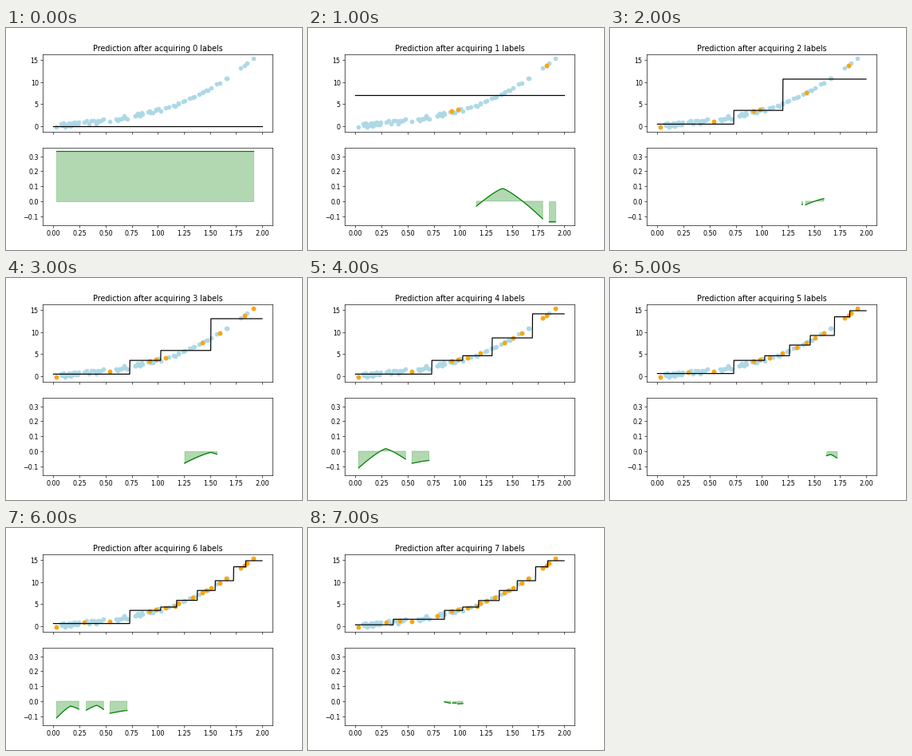
A matplotlib script that plays this animation: 371 px wide and 278 px high, repeating every 8000 ms.

```python
import numpy as np
import matplotlib.pyplot as plt
from matplotlib.animation import FuncAnimation

BATCH = 3
MIN_LEAF = 2
STEPS = 8
GAP = (np.nan, np.nan)

rng = np.random.default_rng(4)
grid = np.linspace(0, 2, 1000)


def trend(x):
    return 1.94 * x + 1.66 * x ** 3


def ripple(x):
    return np.where(x < 1.18, 0.33 * np.sin(11.2 * (x - 0.22)), 0)


def cluster(start, stop, count):
    """Noisy points along the trend; the noise fades to the right."""
    x = np.linspace(start, stop, count)
    spread = 0.1 + 0.45 * np.clip(5 - 4 * x, 0, 1)
    return np.column_stack([x, trend(x) + rng.uniform(-1, 1, count) * spread])


def predict(x, y):
    """Regression tree on sorted points, evaluated on the grid."""
    n = len(x)
    if n == 0:
        return np.zeros_like(grid)
    if n < 2 * MIN_LEAF:
        return np.full_like(grid, y.mean())

    def gain(k):
        return k * y[:k].mean() ** 2 + (n - k) * y[k:].mean() ** 2

    k = max(range(MIN_LEAF, n - MIN_LEAF + 1), key=gain)
    cut = (x[k - 1] + x[k]) / 2
    return np.where(grid <= cut, predict(x[:k], y[:k]), predict(x[k:], y[k:]))


def flank(foot, peak):
    """Slightly rounded slope from foot up to peak."""
    u = np.linspace(1, 0, 20)[:, None]
    return np.array(peak) + np.subtract(foot, peak) * u ** [1, 1.25]


def tent(start, peak, end=None):
    sides = [flank(start, peak)]
    if end:
        sides.append(flank(end, peak)[::-1])
    return np.vstack([*sides, GAP])


# Labelled positions in order of acquisition, one batch per row.
label_x = np.array([
    0.922, 0.983, 1.832,
    0.03, 0.542, 1.423,
    1.075, 1.595, 1.918,
    1.197, 1.507, 1.797,
    0.297, 1.335, 1.855,
    1.163, 1.467, 1.656,
    0.428, 0.785, 1.255,
])
label_y = trend(label_x) + ripple(label_x)

pool = np.vstack([
    cluster(0.07, 0.243, 14), cluster(0.32, 0.48, 8), cluster(0.6, 0.705, 8),
    cluster(0.785, 0.855, 7), cluster(0.905, 1.03, 6),
    cluster(1.105, 1.245, 4), cluster(1.305, 1.48, 5), cluster(1.565, 1.66, 2),
])

# Acquisition score after each batch, one tent per stretch of the pool.
shoulder = tent((0.542, -0.081), (0.705, -0.062))
scores = [
    [tent((0.03, 1 / 3), (1.918, 1 / 3))],
    [tent((1.16, -0.033), (1.41, 0.085), (1.795, -0.118)),
     tent((1.857, -0.137), (1.915, -0.137))],
    [tent((1.385, -0.022), (1.391, -0.02)),
     tent((1.42, -0.024), (1.595, 0.017))],
    [tent((1.255, -0.08), (1.507, -0.008), (1.565, -0.02))],
    [tent((0.03, -0.112), (0.29, 0.017), (0.48, -0.053)), shoulder],
    [tent((1.62, -0.03), (1.66, -0.022), (1.72, -0.045))],
    [tent((0.03, -0.112), (0.165, -0.033), (0.243, -0.053)),
     tent((0.315, -0.06), (0.415, -0.028), (0.48, -0.055)), shoulder],
    [tent((0.852, -0.004), (0.91, -0.013)),
     tent((0.93, -0.012), (0.965, -0.012)),
     tent((0.98, -0.018), (1.03, -0.016))],
]

fig, (top, low) = plt.subplots(2, 1, sharex=True, figsize=(6.4, 4.8), dpi=58)
top.set(xlim=(-0.1, 2.1), ylim=(-1.35, 16.25))
low.set_ylim(-0.1625, 0.357)

top.scatter(*pool.T, color="lightblue")
top.scatter(label_x, label_y, color="lightblue")
chosen = top.scatter([], [], color="orange")
model, = top.plot([], [], color="black")
curve, = low.plot([], [], color="green")
title = top.set_title("")
fills = []


def update(n):
    title.set_text(f"Prediction after acquiring {n} labels")
    x, y = label_x[:BATCH * n], label_y[:BATCH * n]
    chosen.set_offsets(np.column_stack([x, y]))
    order = np.argsort(x)
    model.set_data(grid, predict(x[order], y[order]))

    sx, sy = np.vstack(scores[n]).T
    curve.set_data(sx, sy)
    while fills:
        fills.pop().remove()
    fills.append(low.fill_between(sx, 0, sy, color="green", alpha=0.3))
    return title, chosen, model, curve, *fills


anim = FuncAnimation(fig, update, frames=STEPS, interval=1000,
                     init_func=lambda: update(0), repeat=True, repeat_delay=0)
plt.show()
```
